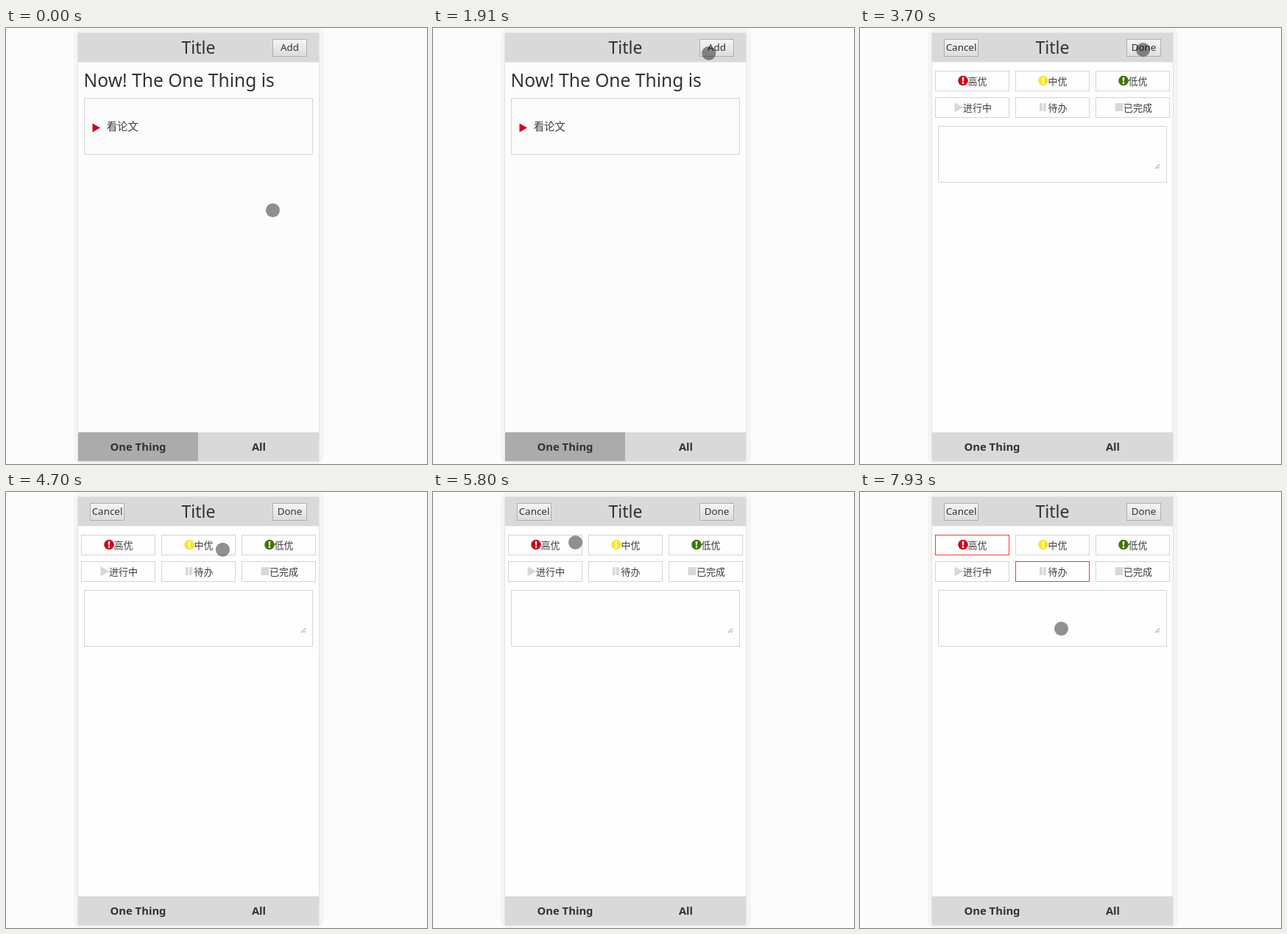
An HTML page that plays this animation: 572 by 592 pixels, repeating every 8000 ms.

```html
<!DOCTYPE html>
<html lang="zh-CN">
<head>
<meta charset="utf-8">
<title>To-do prototype</title>
<style>
  html, body { margin: 0; width: 100%; height: 100%; overflow: hidden; background: #fcfcfc; }
  svg { display: block; }
  text { font-family: "Noto Sans", "Noto Sans CJK SC", "Noto Sans CJK", sans-serif; fill: #333; }
  .cjk { font-family: "Noto Sans CJK SC", "Noto Sans CJK", sans-serif; fill: #3c3c3c; }
  .mid { text-anchor: middle; }
  .tab { font-size: 14.8px; font-weight: 700; }
  .box { fill: none; stroke: #d4d4d4; }
  .box.on { stroke: #f23c3c; }
</style>
</head>
<body>
<svg width="572" height="592" viewBox="0 0 572 592">
  <defs>
    <linearGradient id="face" x2="0" y2="1">
      <stop offset="0" stop-color="#f5f5f5"/>
      <stop offset="1" stop-color="#dcdcdc"/>
    </linearGradient>
  </defs>

  <rect x="92" y="0" width="340" height="592" rx="10" fill="#f4f4f4"/>
  <rect x="97.5" y="6.5" width="328" height="582" fill="#fcfcfc" stroke="#e4e4e4"/>
  <rect x="98" y="7" width="327" height="39.5" fill="#d9d9d9"/>
  <rect x="98" y="549" width="327" height="39" fill="#d9d9d9"/>
  <text class="mid" x="261.5" y="35" font-size="23.1">Title</text>

  <g id="home">
    <rect x="98" y="549" width="163" height="39" fill="#ababab"/>
    <text x="105.6" y="80" font-size="24.6">Now! The One Thing is</text>
    <rect class="box" x="106.5" y="95.5" width="310" height="76"/>
    <path d="M117.5 129.5l10.5 6l-10.5 6z" fill="#d0021b"/>
    <text class="cjk" x="136.7" y="139.3" font-size="14.4">看论文</text>
  </g>

  <g id="form">
    <rect x="98" y="46.5" width="323" height="502.5" fill="#fefefe"/>
    <rect class="box" x="106.5" y="133.5" width="310" height="76"/>
    <path d="M401 191l6-6M404.5 191l2.5-2.5" stroke="#777" stroke-width=".9"/>
  </g>

  <text class="mid tab" x="179.5" y="574">One Thing</text>
  <text class="mid tab" x="343.5" y="574">All</text>
  <circle id="dot" r="9.5" fill="#000" fill-opacity=".43"/>
</svg>

<script>
const LOOP = 8000, STEP = 135;
const FORM_AT = 3700, HIGH_AT = 6360, TODO_AT = 7530;

const $ = id => document.getElementById(id);
const home = $('home'), form = $('form'), dot = $('dot');

function add(parent, tag, attrs, label) {
  const el = document.createElementNS('http://www.w3.org/2000/svg', tag);
  for (const k in attrs) el.setAttribute(k, attrs[k]);
  if (label) el.textContent = label;
  parent.appendChild(el);
  return el;
}

function button(parent, x, label) {
  add(parent, 'rect', { x: x + .5, y: 15.5, width: 46, height: 23, fill: 'url(#face)', stroke: '#b0b0b0' });
  add(parent, 'text', { class: 'mid', x: x + 23.5, y: 31.2, 'font-size': 13.4 }, label);
}

// Icon and label share one centred line, an em being 13 px
function option(col, row, label, color, icon) {
  const em = 13, x = 102 + col * 109, y = 58 + row * 36;
  const left = x + 50.5 - em * (label.length + 1) / 2;
  const g = add(form, 'g', { transform: `translate(${left} ${y + 7})` });
  if (icon) {
    add(g, 'path', { d: icon, fill: color });
  } else {
    add(g, 'circle', { cx: 7, cy: 6.5, r: 6.8, fill: color });
    add(g, 'path', { d: 'M5.6 2h2.8l-.5 5.4h-1.8zM5.8 8.6h2.4v2.2h-2.4z', fill: '#fff' });
  }
  add(g, 'text', { class: 'cjk', x: em + .6, y: 11.8, 'font-size': em }, label);
  return add(form, 'rect', { class: 'box', x: x + .5, y: y + .5, width: 100, height: 27 });
}

button(home, 362, 'Add');
button(form, 114, 'Cancel');
button(form, 362, 'Done');

const grey = '#d8d8d8';
const high = option(0, 0, '高优', '#d0021b');
option(1, 0, '中优', '#f5e532');
option(2, 0, '低优', '#417505');
option(0, 1, '进行中', grey, 'M2 0l11.5 6.8l-11.5 6.8z');
const todo = option(1, 1, '待办', grey, 'M2 1h3.7v11h-3.7zM7 1h3.7v11h-3.7z');
option(2, 1, '已完成', grey, 'M2 1h11v11h-11z');

// Pointer glides: each reaches its goal in a few held steps, slowing down
const home0 = { x: 362.5, y: 247.5 };
const glides = [
  { at: 650, steps: 1, x: 365.5, y: 217.5 },
  { at: 800, steps: 2, x: 375.5, y: 87.5 },
  { at: 1340, steps: 1, x: 361, y: 56.5 },
  { at: 1760, steps: 3, x: 376.5, y: 31.5 },
  { at: 3120, steps: 1, x: 384.5, y: 29.5 },
  { at: 4700, steps: 2, x: 264.5, y: 94.5 },
  { at: 5100, steps: 6, x: 193.5, y: 68.5 },
  { at: 7070, steps: 1, x: 195.5, y: 80.5 },
  { at: 7220, steps: 1, x: 262.5, y: 104.5 },
  { at: 7795, steps: 2, x: 273.5, y: 185.5 }
];
const easeOut = u => 1 - (1 - u) ** 2;

function pointer(t) {
  let { x, y } = home0;
  for (const g of glides) {
    if (t < g.at) break;
    const done = Math.min(g.steps, Math.floor((t - g.at) / STEP) + 1);
    const p = easeOut(done / g.steps);
    x += (g.x - x) * p;
    y += (g.y - y) * p;
  }
  return { x, y };
}

function draw(t) {
  const { x, y } = pointer(t);
  dot.setAttribute('cx', x);
  dot.setAttribute('cy', y);
  home.style.display = t < FORM_AT ? '' : 'none';
  form.style.display = t < FORM_AT ? 'none' : '';
  high.classList.toggle('on', t >= HIGH_AT);
  todo.classList.toggle('on', t >= TODO_AT);
}

const start = performance.now();
function tick() {
  draw((performance.now() - start) % LOOP);
  requestAnimationFrame(tick);
}
tick();
</script>
</body>
</html>
```
